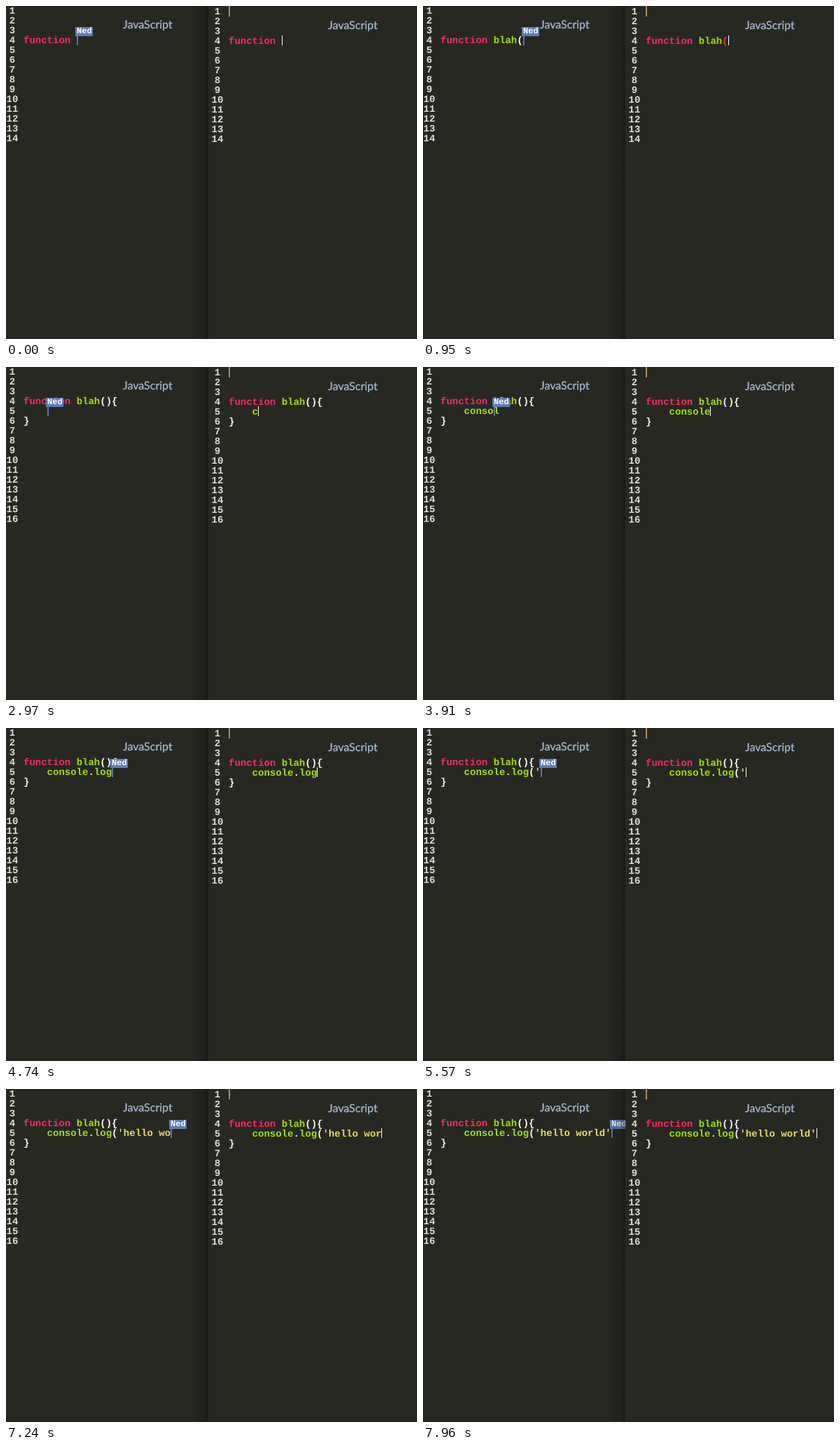
These frames come from a looping animation (587 by 475 pixels, 8 s). An HTML page:

```html
<!DOCTYPE html>
<html lang="en">
<head>
<meta charset="utf-8">
<title>Shared editor</title>
<style>
html, body { margin: 0; width: 100%; height: 100%; overflow: hidden; background: #272822; }
body { position: relative; text-rendering: geometricPrecision; }
.pane { position: absolute; top: 0; bottom: 0; overflow: hidden; background: #272822; }
#left { left: 0; width: 289px; }
#right { left: 289px; right: 0; }
.pane > * { position: absolute; }
pre { margin: 0; font: bold 14px/14px "Liberation Mono", "Courier New", monospace; color: #f8f8f2; }
#left pre { top: 1px; }
#right pre { top: 2px; }
.nums { width: 26px; text-align: center; color: #deded9; }
#left .nums { left: -4px; }
#right .nums { left: 0; }
#left .code { left: 25px; }
#right .code { left: 29px; }
.lang { font: 16px/20px Lato, sans-serif; color: #a6b6d0; -webkit-text-stroke: .3px #a6b6d0; }
#left .lang { left: 167px; top: 17px; }
#right .lang { left: 171px; top: 18px; }
.caret { height: 14px; }
#left .caret { width: 2px; background: #5a75b3; }
#right .caret { width: 1px; background: #fff; }
.peer { left: 29px; top: 0; width: 2px; height: 15px; background: #ab8e57; }
.tag {
  width: 23px; height: 13px; padding-left: 2px; background: #5f7bb8; color: #fff;
  font: bold 12px/13px "Liberation Mono", "Courier New", monospace;
}
.edge {
  left: 268px; top: 0; width: 21px; height: 100%;
  background: linear-gradient(90deg, rgba(0,0,0,.08), rgba(0,0,0,.16) 15px, rgba(0,0,0,.28) 17px, rgba(0,0,0,.3));
}
.key { color: #fd2a66; }
.id { color: #a0e303; }
.str { color: #e8dc64; }
.ok { color: #fff; text-decoration: underline 1px; text-underline-offset: 1px; text-decoration-skip-ink: none; }
.bad { color: #ff2a22; }
</style>
</head>
<body>
<div class="pane" id="left">
  <pre class="nums"></pre>
  <pre class="code"></pre>
  <div class="caret"></div>
  <div class="tag">Ned</div>
  <div class="lang">JavaScript</div>
  <div class="edge"></div>
</div>
<div class="pane" id="right">
  <pre class="nums"></pre>
  <pre class="code"></pre>
  <div class="peer"></div>
  <div class="caret"></div>
  <div class="lang">JavaScript</div>
</div>
<script>
const LOOP = 8000, LAG = 115, CHAR = 8.4, LINE = 14;

// [time, keys, text lag, caret lag]; "<" steps the caret back
const keys = [
  [120, "b"], [230, "la"], [350, "h"], [830, "("], [1180, ")"],
  [1540, "{"], [1660, "}"], [1900, "<"], [2020, "\n"], [2260, "\n", 0],
  [2380, "<"], [2490, "    "],
  [2970, "c"], [3090, "o"], [3210, "n"],
  [3570, "s"], [3690, "o"], [3795, "l", LAG, 230], [3910, "e"], [4140, "."],
  [4380, "l"], [4500, "o"], [4620, "g"], [4860, "("], [5450, "'"],
  [5810, "h"], [5930, "e"], [6050, "l"], [6160, "l"], [6520, "o", 0],
  [6880, " "], [7000, "w"], [7120, "o"], [7240, "r"], [7360, "l"], [7480, "d"],
  [7840, "'"]
];

let text = "\n\n\nfunction " + "\n".repeat(10);
let pos = 12;
const states = [snapshot(0)];
for (const [time, typed, lag = LAG, caretLag = lag] of keys) {
  if (typed === "<") pos--;
  else {
    text = text.slice(0, pos) + typed + text.slice(pos);
    pos += typed.length;
  }
  states.push(snapshot(time, time + lag, time + caretLag));
}

function snapshot(time, textTime = 0, caretTime = 0) {
  const before = text.slice(0, pos).split("\n");
  return { time, textTime, caretTime, text, pos, row: before.length - 1, col: before.pop().length };
}

function latest(field, t) {
  let found = states[0];
  for (const s of states) if (s[field] <= t) found = s;
  return found;
}

// Marks the bracket beside the caret and its partner
function brackets(src, at) {
  const pairs = "(){}";
  const isBracket = i => i >= 0 && i < src.length && pairs.includes(src[i]);
  const start = isBracket(at - 1) ? at - 1 : at;
  if (!isBracket(start)) return {};
  const kind = pairs.indexOf(src[start]);
  const step = kind % 2 ? -1 : 1;
  const stack = [];
  for (let i = start; i >= 0 && i < src.length; i += step) {
    if (!isBracket(i)) continue;
    const k = pairs.indexOf(src[i]);
    if ((k % 2 ? -1 : 1) === step) stack.push(k);
    else {
      const good = stack.pop() === (k ^ 1);
      if (!good || !stack.length) {
        const cls = good ? "ok" : "bad";
        return { [start]: cls, [i]: cls };
      }
    }
  }
  return { [start]: "bad" };
}

function paint(src, marks) {
  return src.replace(/'[^'\n]*'?|[a-z]+|[^]/g, (word, i) => {
    const cls = marks[i] ||
      (word === "function" ? "key" : word[0] === "'" ? "str" : /[a-z]/.test(word) ? "id" : "");
    return cls ? `<span class="${cls}">${word}</span>` : word;
  });
}

function place(el, x, y) {
  el.style.left = x + "px";
  el.style.top = y + "px";
}

function pane(id) {
  const find = name => document.querySelector(`#${id} .${name}`);
  return { nums: find("nums"), code: find("code"), caret: find("caret"), tag: find("tag") };
}

function fill(p, s, marks) {
  if (p.shown === s) return;
  p.shown = s;
  p.nums.textContent = s.text.split("\n").map((_, i) => i + 1).join("\n");
  p.code.innerHTML = paint(s.text, marks);
}

const left = pane("left"), right = pane("right");

function draw(now) {
  const t = now % LOOP;

  const own = latest("time", t);
  fill(right, own, brackets(own.text, own.pos));
  place(right.caret, Math.round(318 + own.col * CHAR) - 289, own.row * LINE);

  fill(left, latest("textTime", t), {});
  const far = latest("caretTime", t);
  const x = Math.round(25 + far.col * CHAR), y = far.row * LINE;
  place(left.caret, x, y);
  place(left.tag, x - 2, y - 12);
}

const begin = performance.now();
function tick() {
  draw(performance.now() - begin);
  requestAnimationFrame(tick);
}
tick();
</script>
</body>
</html>
```
